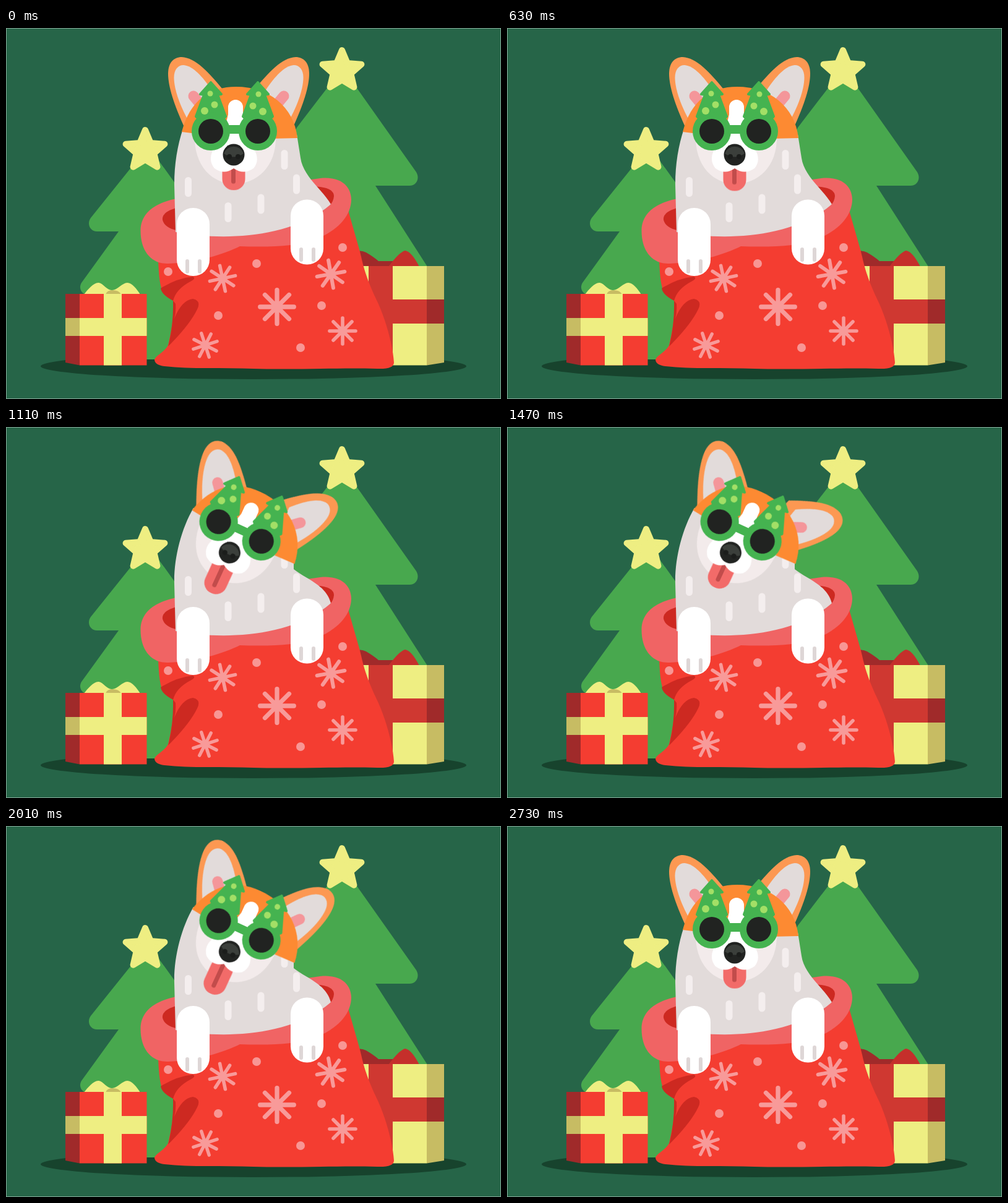
These frames come from a looping animation (800x600 px, 2760 ms). An HTML page without scripts:

```html
<!DOCTYPE html>
<html lang="en">
<head>
<meta charset="utf-8">
<title>Christmas corgi</title>
<style>
  html, body { margin: 0; width: 100%; height: 100%; overflow: hidden; background: #266548; }
  svg { display: block; width: 100vw; height: 100vh; }

  :root {
    --loop: 2760ms;
    --tilt: cubic-bezier(.33, 0, .67, 1);
    --sine: cubic-bezier(.37, 0, .63, 1);
  }

  .tree { fill: #48a84e; }
  .yellow { fill: #eeee82; }
  .olive { fill: #c7bc63; }
  .red { fill: #f43d31; }
  .crimson { fill: #cf3831; }
  .maroon { fill: #a02a2a; }
  .bow { fill: #c52f2b; }
  .fold { fill: #cd2921; }
  .cuff { fill: #f06464; }
  .fur { fill: #e2dbda; }
  .tuft { fill: #f4eeee; }
  .toe { fill: #ded6d6; }
  .orange { fill: #fd8a32; }
  .peach { fill: #fc9852; }
  .pale { fill: #f3ebeb; }
  .white { fill: #fff; }
  .black { fill: #212321; }
  .lime { fill: #a3df66; }
  .star { fill: #eeee82; stroke: #eeee82; stroke-width: 10; stroke-linejoin: round; }
  .frost { fill: #f89694; }
  .flake { fill: none; stroke: #f89a99; stroke-width: 5.6; stroke-linecap: round; }
  .specs { fill: #45b350; stroke: #45b350; stroke-width: 4; stroke-linejoin: round; }

  .head, .ear, .body { animation: var(--loop) infinite; }
  .head { transform-origin: 369px 189px; animation-name: tilt; animation-timing-function: var(--tilt); }
  .body { animation-name: lean; animation-timing-function: var(--tilt); }
  .ear { transform-origin: 431px 129px; animation-name: flap; animation-timing-function: var(--sine); }
  .tongue { animation: pant calc(var(--loop) / 18) -10ms infinite alternate var(--sine); }

  @keyframes tilt {
    0%, 25%, 93.48%, 100% { transform: rotate(0deg); }
    40.22%, 78.26% { transform: rotate(24.6deg); }
  }
  @keyframes lean {
    0%, 25%, 93.48%, 100% {
      d: path("M286 163C277 190 272 220 272 253L274 330C345 344 460 342 525 285C512 262 480 240 476 210L470 172Z");
    }
    40.22%, 78.26% {
      d: path("M303 131C283 165 271 213 272 253L274 330C345 344 460 342 525 285C517 255 485 246 465 230L465 217Z");
    }
  }
  /* six flaps while the head is tilted */
  @keyframes flap {
    0%, 34.02%, 41.85%, 49.67%, 57.5%, 65.33%, 73.15%, 80.98%, 100% { transform: rotate(0deg); }
    37.94%, 45.76%, 53.59%, 61.41%, 69.24%, 77.07% { transform: rotate(27deg); }
  }
  @keyframes pant {
    from { transform: translateY(0); }
    to { transform: translateY(19px); }
  }
</style>
</head>
<body>
<svg viewBox="0 0 800 600">
  <defs>
    <path id="star" class="star" d="M0-33L8.8-12.1 31.4-10.2 14.3 4.6 19.4 26.7 0 15-19.4 26.7-14.3 4.6-31.4-10.2-8.8-12.1Z"/>
    <path id="flake" class="flake" d="M-21 0H21M0-21V21M-15-15L15 15M-15 15L15-15"/>
    <circle id="dot" class="frost" r="7"/>
    <rect id="tuft" class="tuft" x="-5.5" y="-16" width="11" height="32" rx="5.5"/>
    <g id="ear">
      <path class="peach" d="M288 160C272 125 262 95 262 74C262 56 271 47 284 47C306 48 328 72 350 99L345 150Z"/>
      <path class="fur" d="M298 156C282 128 271.500 100 271.500 80C271.500 67 278 60 287 60C302 61 318 79 332 100L322 150Z"/>
      <path d="M303 110L318 128" fill="none" stroke="#f4969a" stroke-width="17" stroke-linecap="round"/>
    </g>
    <g id="lens">
      <path class="specs" d="M0-79L17-60 11-59 24-24 20-20H-20L-24-24-11-59-17-60Z"/>
      <circle class="specs" r="29"/>
      <circle class="black" r="20"/>
    </g>
    <g id="toes">
      <rect class="toe" x="14" width="6" height="23" rx="3"/>
      <rect class="toe" x="34" width="6" height="23" rx="3"/>
    </g>
  </defs>

  <rect width="800" height="600" fill="#266548"/>
  <ellipse cx="400" cy="547" rx="344" ry="21" fill="#17432d"/>

  <!-- trees -->
  <path class="tree" d="M210 216L137 307C130 317 136 329 147 329H182L122 412C118 419 120 426 126 430L200 470V536H300V288L240 205Z"/>
  <use href="#star" x="225" y="198"/>
  <path class="tree" d="M526 88L470 161L430 230V400H690L597 255H652C664 255 669 243 663 233L562 90Z"/>
  <use href="#star" x="543" y="69"/>

  <!-- left gift -->
  <path class="yellow" d="M126 431C132 423 142 411 150 412C157 413 163 424 171 424C180 424 188 412 196 412C204 412 211 422 217 431Z"/>
  <path class="olive" d="M161 431Q163 424 172 424Q183 424 186 431Z"/>
  <rect class="red" x="119" y="430" width="108.500" height="115.500"/>
  <path class="maroon" d="M96 430H119V545.500L96 541Z"/>
  <path class="yellow" d="M158 430H187V469H227.500V498H187V545.500H158V498H119V469H158Z"/>
  <path class="olive" d="M96 469H119V498H96Z"/>

  <!-- right gift -->
  <path class="maroon" d="M560 386V365Q571 357 582 363Q594 370 602 377H626L634 386Z"/>
  <path class="bow" d="M618 386Q636 362 645 360Q655 361 668 386Z"/>
  <rect class="yellow" x="560" y="385" width="120" height="160.500"/>
  <path class="olive" d="M680 385H708V541L680 545.500Z"/>
  <path class="crimson" d="M586 385H625V439H680V478H625V545H586Z"/>
  <path class="maroon" d="M680 439H708V478H680Z"/>

  <!-- sack -->
  <path class="red" d="M245 360C247 385 246 405 252 424Q258 433 270 441C272 470 266 495 262 513C256 524 243 529 240 536Q240 545 256 547C300 552 350 549 400 551C470 553 540 549 600 551Q627 552 627 541C625 512 613 468 598 438C578 395 577 380 571 358L553 295Z"/>
  <path class="fold" d="M250 421Q275 405 302 402Q308 405 298 410Q275 422 270 441Q252 432 250 421Z"/>
  <path class="fold" d="M270 441L274 446Q275 460 272 470Q284 440 302 438Q316 441 309 455Q297 480 262 515Q271 480 270 441Z"/>
  <use href="#dot" x="262" y="394"/>
  <use href="#dot" x="405" y="381"/>
  <use href="#dot" x="544" y="355"/>
  <use href="#dot" x="343" y="465"/>
  <use href="#dot" x="510" y="449"/>
  <use href="#dot" x="476" y="517"/>
  <use href="#flake" transform="translate(350 405) rotate(-12)"/>
  <use href="#flake" transform="translate(525 398) rotate(-10) scale(1.08)"/>
  <use href="#flake" transform="translate(438 451) scale(1.3)"/>
  <use href="#flake" transform="translate(544 490)"/>
  <use href="#flake" transform="translate(322 513) rotate(-18) scale(.96)"/>
  <path class="cuff" d="M280 275C241 282 217.500 299 217.500 328C217.500 362 236 382 262 381C310 379 352 366 378 353C405 354 435 354 460 351C520 344 558 312 558 277C557 253 538 240 508 243Z"/>
  <path class="fold" d="M280 290C260 294 252 302 253 310C255 320 266 326 280 328Z"/>
  <path class="fold" d="M495 256Q530 257 530 272Q529 281 524 286Z"/>

  <!-- body -->
  <path class="fur body" d="M286 163C277 190 272 220 272 253L274 330C345 344 460 342 525 285C512 262 480 240 476 210L470 172Z"/>
  <use href="#tuft" x="294.500" y="257"/>
  <use href="#tuft" x="359" y="298"/>
  <use href="#tuft" x="412" y="284.500"/>
  <use href="#tuft" x="450" y="213"/>
  <use href="#tuft" x="469.500" y="252.500"/>

  <!-- head -->
  <g class="head">
    <use href="#ear"/>
    <g class="ear"><use href="#ear" transform="matrix(-1 0 0 1 752 0)"/></g>
    <path class="orange" d="M284 168C297 118 328 95 372 95C424 95 465 126 471 178L380 180Z"/>
    <path class="pale" d="M305 172C303 225 335 252 369 252C405 252 437 225 436 175Z"/>
    <g class="tongue">
      <rect x="349.500" y="200" width="37" height="62" rx="18" fill="#f26b69"/>
      <rect x="364" y="205" width="7" height="46.500" rx="3.500" fill="#c24c4b"/>
    </g>
    <path class="white" d="M359 128A12 12 0 0 1 383 128V140L386 156L379 168Q386 188 401 196Q411 214 400 227Q384 238 368 227Q352 238 337 227Q326 214 335 196Q352 188 361 168L355 156L359 140Z"/>
    <circle class="black" cx="368" cy="205" r="17.500"/>
    <path d="M352 203A17 17 0 0 1 384 203Q368 214 352 203Z" fill="#3b3f3b"/>
    <circle cx="361" cy="208" r="4" fill="#1b1d1b"/>
    <circle cx="375" cy="208" r="4" fill="#1b1d1b"/>
    <rect x="355" y="157" width="28" height="14" fill="#45b350"/>
    <use href="#lens" x="331" y="167"/>
    <use href="#lens" x="407" y="167"/>
    <g class="lime">
      <circle cx="330" cy="106" r="4.500"/>
      <circle cx="337" cy="124" r="5.500"/>
      <circle cx="321" cy="134" r="6"/>
      <circle cx="408" cy="107" r="4.500"/>
      <circle cx="399" cy="126" r="5.500"/>
      <circle cx="415" cy="135" r="6"/>
    </g>
  </g>

  <!-- paws -->
  <rect class="white" x="276" y="291" width="53" height="110" rx="26"/>
  <use href="#toes" x="276" y="374"/>
  <rect class="white" x="460" y="277.500" width="53" height="105" rx="26"/>
  <use href="#toes" x="460" y="355"/>

  <rect x=".5" y=".5" width="799" height="599" fill="none" stroke="#fff" stroke-opacity=".45"/>
</svg>
</body>
</html>
```
